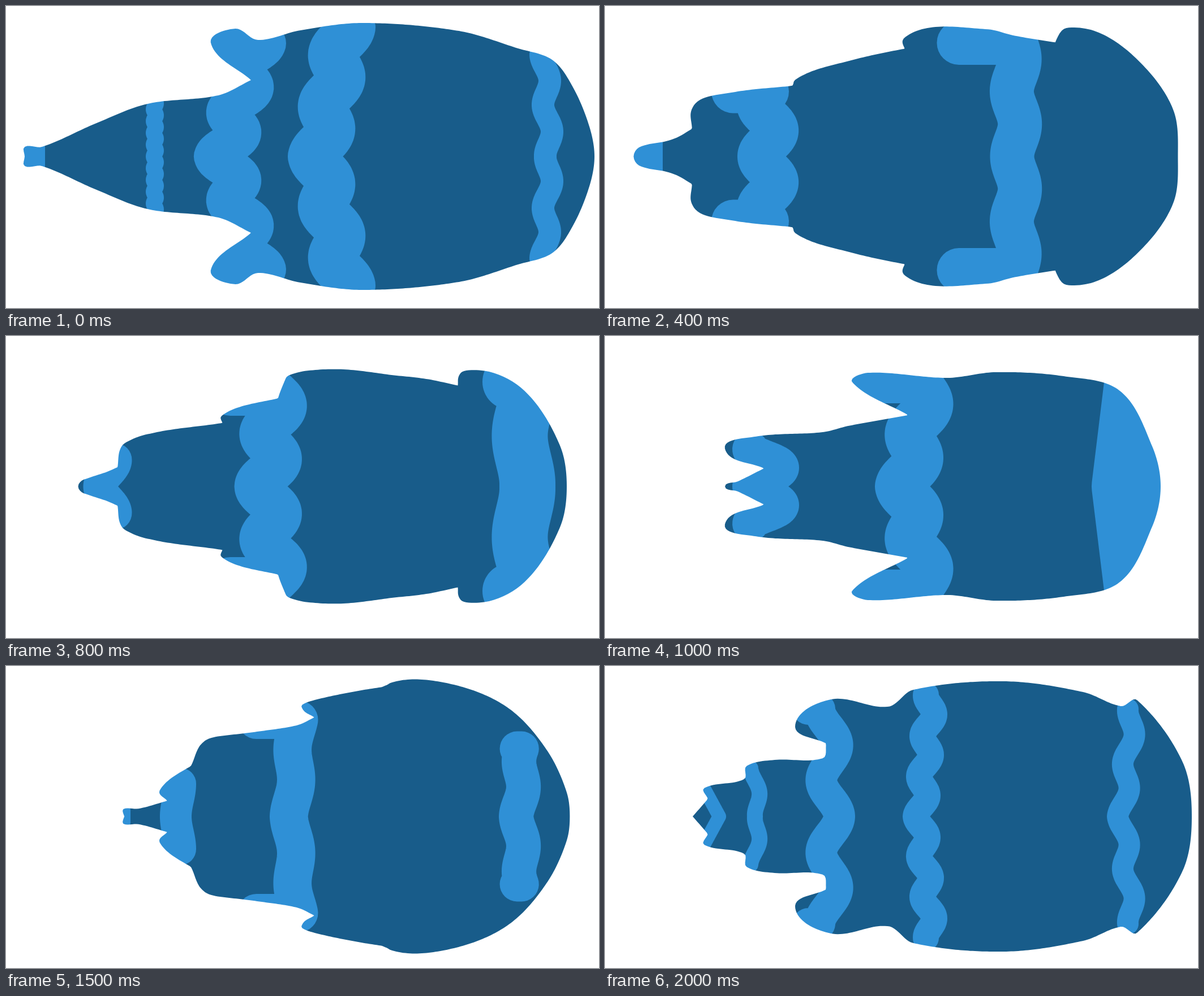
Write an HTML page with a canvas that moves like this. It is 1048 px wide and 534 px high and loops after 2100 ms.

```html
<!DOCTYPE html>
<html lang="en">
<head>
<meta charset="utf-8">
<title>Banded shell</title>
<style>
  html, body { margin: 0; width: 100%; height: 100%; overflow: hidden; background: #fff; }
  canvas { display: block; width: 100%; height: 100%; }
</style>
</head>
<body>
<canvas id="stage" width="1048" height="534"></canvas>
<script>
const AXIS = 266, STEP = 100, LOOP = 2100, SAMPLES = 300;
const DARK = '#185c8a', LIGHT = '#2f90d6';

// A ribbon crosses the shell symmetrically. From its middle x at the axis it swings
// sideways through `bends` half waves, leans as it rises and may end in a hooked arm.
const ribbon = (mid, width, rise, bends = 0, swing = 0, lean = 0, arm = 0) =>
  ({ mid, width, rise, bends, swing, lean, arm });

// Key points of the upper outline, tail to front; "!" marks a sharp corner.
// Ribbons that share a letter in neighbouring poses are the same one drifting along.
const poses = [
  { at: 0,
    body: '33,266! 33,249 64,249 160,207 250,173 375,158 433,131! 362,66 405,40 445,60 520,43 630,30 800,44 905,75 965,95 1000,140 1030,210 1040,266',
    bands: {
      p: ribbon(50, 38, 16),
      q: ribbon(261, 28, 104, 10, 4),
      r: ribbon(368, 72, 200, 5, 36, 55, 85),
      s: ribbon(541, 86, 228, 5, 24, 45),
      u: ribbon(953, 40, 180, 4, 14, -8)
    } },
  { at: 200,
    body: '58,266 75,250 137,237 167,216! 97,172 170,147 310,143 430,116 550,80! 446,53 590,16 640,23 748,18 875,38 955,88 1018,175 1025,266',
    bands: {
      p: ribbon(178, 80, 90, 2, 20, 0, 60),
      r: ribbon(521, 88, 212, 3, 60, 10, 130),
      s: ribbon(905, 60, 226, 6, 16, -10)
    } },
  { at: 600,
    body: '43,266 50,248 98,236 205,189 245,168 384,137! 327,122 420,82 540,68 665,50 770,69 872,111! 805,62 855,50 935,110 990,190 1000,266',
    bands: {
      n: ribbon(75, 54, 28),
      p: ribbon(367, 74, 140, 3, 44, -4, 60),
      r: ribbon(918, 68, 190, 4, -32, -12, 70)
    } },
  { at: 1000,
    body: '212,266 235,257 281,234! 212,200 265,178 385,170 430,159 536,140! 437,82 465,65 605,74 690,64 810,71 910,97 967,195 982,266',
    bands: {
      n: ribbon(257, 64, 66, 2, 54),
      p: ribbon(520, 86, 190, 4, 26, 35, 100),
      r: ribbon(925, 130, 180, 0, 0, 22)
    } },
  { at: 1200,
    body: '226,266 230,257 247,248 340,194 394,160! 346,112 390,91 540,72 690,51 740,43! 706,30 763,17 870,64 935,158 967,266',
    bands: {
      n: ribbon(381, 70, 160, 4, 42, 8, 30),
      p: ribbon(745, 90, 232, 6, 26, 15, 20)
    } },
  { at: 1700,
    body: '198,266! 190,252 220,259 275,252! 227,235 297,179 345,150 455,137 530,123 560,102! 468,78 500,57 630,32 770,34 890,72 970,143 1010,220 1016,266',
    bands: {
      l: ribbon(204, 32, 10),
      m: ribbon(300, 56, 58, 1, 8, 0, 40),
      n: ribbon(579, 66, 178, 2, -12, 10, 105),
      p: ribbon(1006, 42, 45)
    } },
  { at: 2000,
    body: '155,266! 182,235! 175,216 246,200 250,177 300,166 385,163 391,137! 336,105 400,59 500,72 545,42 705,27 845,46 912,71 940,60 1020,168 1037,266',
    bands: {
      j: ribbon(202, 24, 46, 0, 0, -25),
      k: ribbon(265, 28, 85, 2, 12, -8),
      l: ribbon(414, 56, 190, 3, -30, -5, 20),
      m: ribbon(549, 46, 215, 6, 18, 18),
      n: ribbon(906, 38, 190, 4, 16, 18)
    } }
];

const mix = (a, b, u) => a + (b - a) * u;
const flip = ([x, y]) => [x, 2 * AXIS - y];
const gap = (a, b) => Math.hypot(b[0] - a[0], b[1] - a[1]);

function parse(text) {
  return text.split(' ').flatMap(item => {
    const point = item.replace('!', '').split(',').map(Number);
    return item.endsWith('!') ? [point, point] : [point];
  });
}

// Smooth curve through the key points, resampled at equal distances.
function trace(text) {
  const pts = parse(text), last = pts.length - 1;
  const at = i => i < 0 ? flip(pts[1]) : i > last ? flip(pts[last - 1]) : pts[i];
  const heading = i => {
    const a = at(i - 1), b = at(i + 1), size = gap(a, b) || 1;
    return [(b[0] - a[0]) / size, (b[1] - a[1]) / size];
  };
  const dense = [pts[0]];
  for (let i = 0; i < last; i++) {
    const a = pts[i], b = pts[i + 1], ha = heading(i), hb = heading(i + 1);
    const reach = gap(a, b) / 3;
    if (!reach) continue;
    for (let k = 1; k <= 16; k++) {
      const u = k / 16, v = 1 - u;
      dense.push([0, 1].map(d =>
        v * v * v * a[d] + 3 * v * v * u * (a[d] + ha[d] * reach) +
        3 * v * u * u * (b[d] - hb[d] * reach) + u * u * u * b[d]));
    }
  }
  const along = [0];
  for (let i = 1; i < dense.length; i++) along.push(along[i - 1] + gap(dense[i - 1], dense[i]));
  const total = along[along.length - 1], even = [];
  for (let n = 0, i = 1; n <= SAMPLES; n++) {
    const goal = total * n / SAMPLES;
    while (i < dense.length - 1 && along[i] < goal) i++;
    const u = (goal - along[i - 1]) / (along[i] - along[i - 1]);
    even.push([0, 1].map(d => mix(dense[i - 1][d], dense[i][d], u)));
  }
  return even;
}

for (const pose of poses) pose.body = trace(pose.body);

const ctx = document.getElementById('stage').getContext('2d');
ctx.lineCap = ctx.lineJoin = 'round';
ctx.fillStyle = DARK;
ctx.strokeStyle = LIGHT;

function drawBody(from, to, u) {
  const half = from.map((p, i) => [mix(p[0], to[i][0], u), mix(p[1], to[i][1], u)]);
  ctx.beginPath();
  for (const [x, y] of [...half, ...half.map(flip).reverse()]) ctx.lineTo(x, y);
  ctx.fill();
}

function drawRibbon({ mid, width, rise, bends, swing, lean, arm }) {
  const x = v => mid + swing * (1 - Math.cos(Math.PI * bends * v)) / 2 + lean * Math.abs(v);
  ctx.beginPath();
  ctx.moveTo(x(1) - arm, AXIS - rise);
  for (let v = -1; v <= 1; v += 1 / 64) ctx.lineTo(x(v), AXIS + v * rise);
  ctx.lineTo(x(1) - arm, AXIS + rise);
  ctx.lineWidth = width;
  ctx.stroke();
}

function blend(a, b, u) {
  return Object.fromEntries(Object.keys(a).map(key => [key, mix(a[key], b[key], u)]));
}

function draw(time) {
  const next = poses.findIndex(pose => pose.at > time);
  const from = poses.at(next < 0 ? -1 : next - 1), to = next < 0 ? from : poses[next];
  const u = (time - from.at) / (to.at - from.at || 1);
  ctx.clearRect(0, 0, 1048, 534);
  ctx.globalCompositeOperation = 'source-over';
  drawBody(from.body, to.body, u);
  ctx.globalCompositeOperation = 'source-atop';
  for (const id in { ...from.bands, ...to.bands }) {
    const a = from.bands[id], b = to.bands[id];
    if (a && b) drawRibbon(blend(a, b, u));
    else if (a ? u < 0.5 : u >= 0.5) drawRibbon(a || b);
  }
}

let shown = -1;
function play() {
  const time = Math.floor(performance.now() % LOOP / STEP) * STEP;
  if (time !== shown) draw(shown = time);
  requestAnimationFrame(play);
}
play();
</script>
</body>
</html>
```
